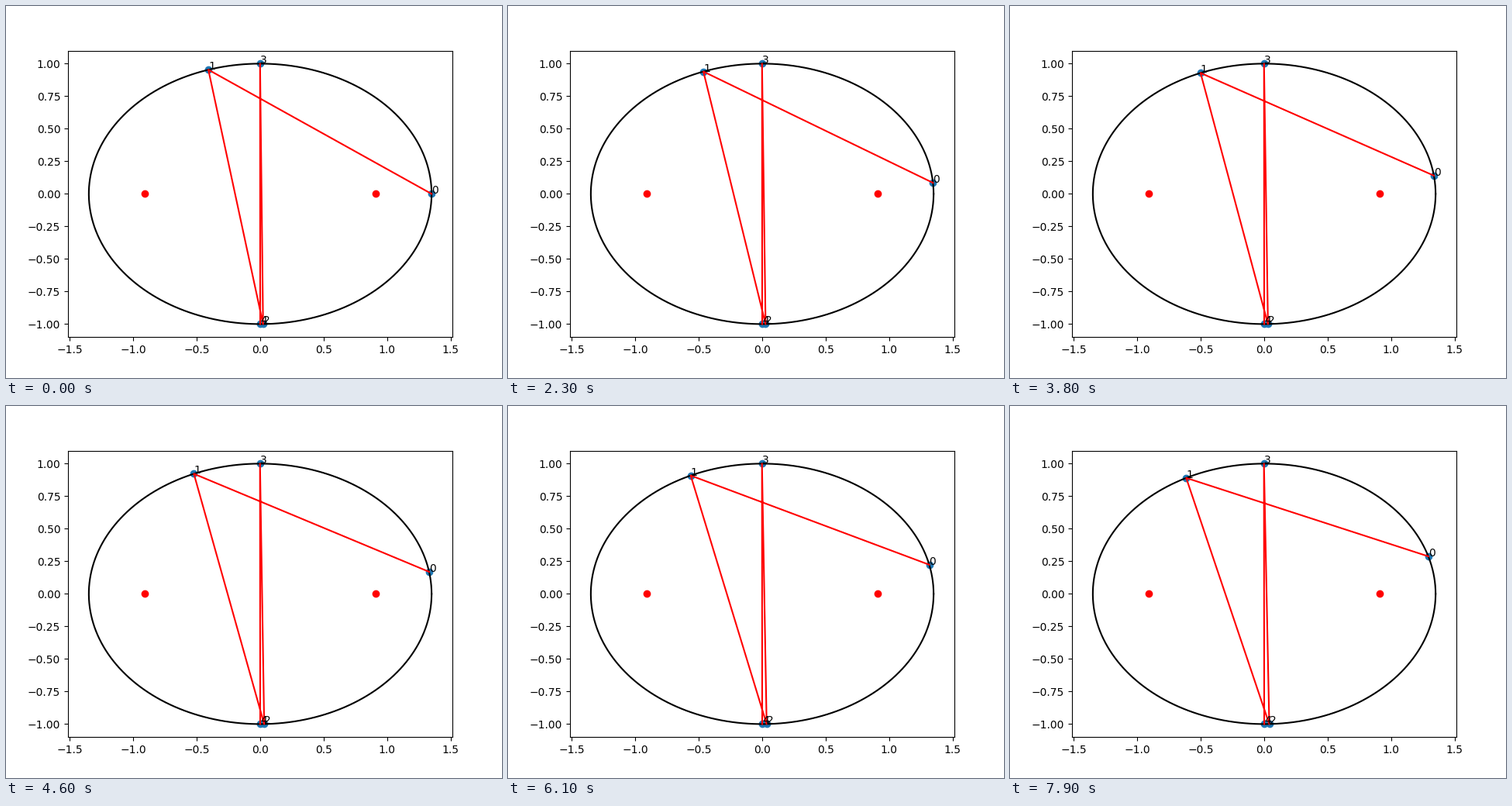
These frames come from a looping animation (640x480 px, 8000 ms). A matplotlib script:

```python
import numpy as np
import matplotlib.pyplot as plt
from matplotlib.animation import FuncAnimation

A, B = 1.35, 1.0      # semi-axes
CHORD = 2.0           # every chord has the length of the minor axis
COUNT = 5             # vertices of the path
STEP = 0.0037         # advance of the first vertex per frame, in radians
FRAMES, INTERVAL = 80, 100


def point(t):
    return np.array([A * np.cos(t), B * np.sin(t)])


def next_angle(t):
    """First angle counter-clockwise from t whose chord reaches CHORD."""
    start = point(t)
    lo, hi = t, t + np.pi
    for _ in range(50):
        mid = (lo + hi) / 2
        if np.hypot(*(point(mid) - start)) < CHORD:
            lo = mid
        else:
            hi = mid
    return hi


def vertices(t):
    angles = [t]
    while len(angles) < COUNT:
        angles.append(next_angle(angles[-1]))
    return np.array([point(a) for a in angles])


fig, ax = plt.subplots(figsize=(6.4, 4.8), dpi=100)
fig.subplots_adjust(left=0.125, right=0.9, bottom=0.11, top=0.88)
ax.set_xlim(-1.514, 1.514)
ax.set_ylim(-1.1, 1.1)

ax.plot(*point(np.linspace(0, 2 * np.pi, 400)), color="black")
focus = np.sqrt(A**2 - B**2)
ax.plot([-focus, focus], [0, 0], "ro")

start = vertices(0)
dots = ax.scatter(*start.T, color="tab:blue")
path, = ax.plot(*start.T, color="red")
labels = [ax.text(x, y, str(i)) for i, (x, y) in enumerate(start)]


def update(frame):
    pts = vertices(frame * STEP)
    dots.set_offsets(pts)
    path.set_data(*pts.T)
    for label, pos in zip(labels, pts):
        label.set_position(pos)
    return [dots, path, *labels]


anim = FuncAnimation(fig, update, frames=FRAMES, interval=INTERVAL,
                     repeat=True, repeat_delay=0)
plt.show()
```
